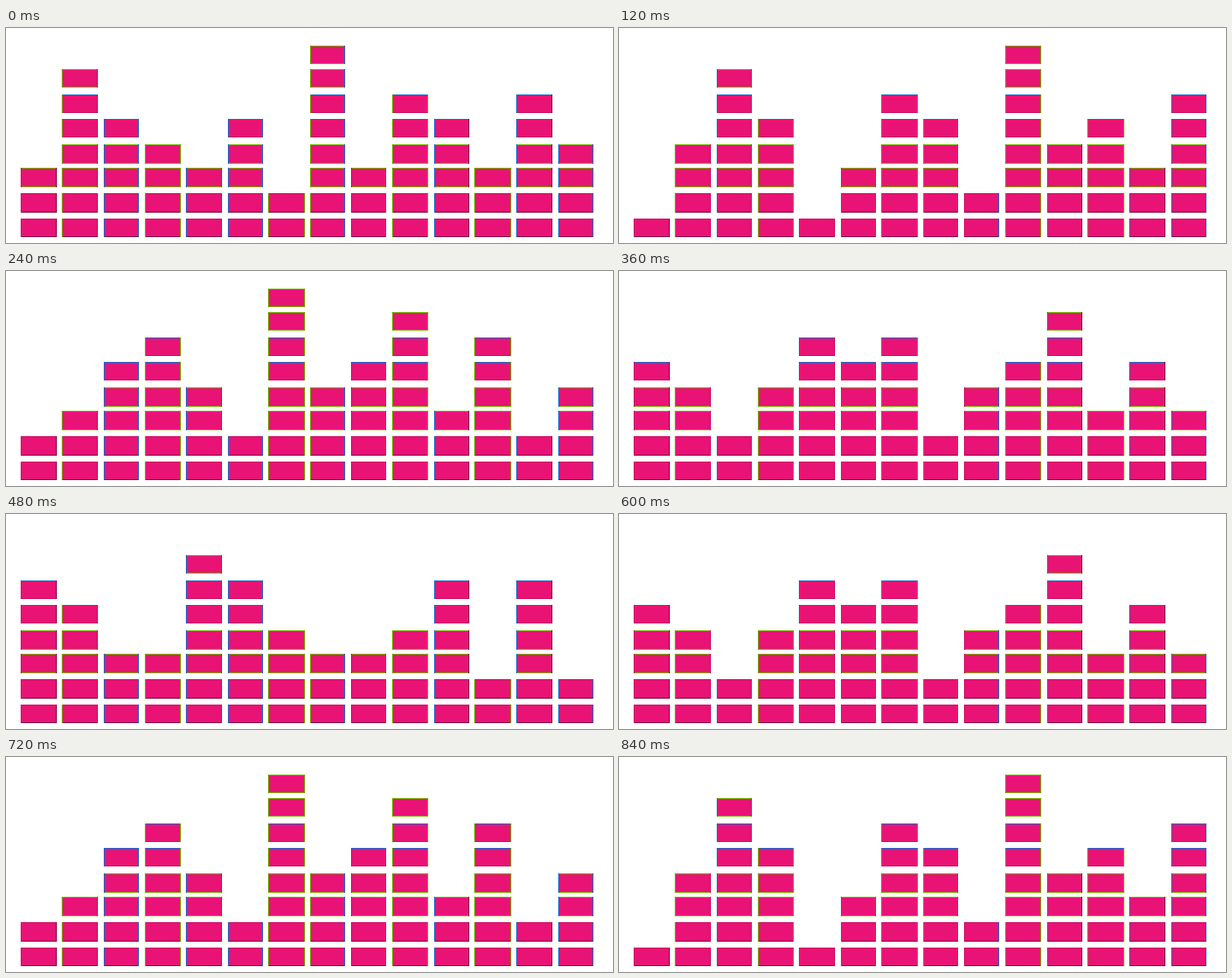
An HTML page with a canvas for the animation above (0.96 s loop, 621 px wide and 220 px high).

```html
<!DOCTYPE html>
<html lang="en">
<head>
<meta charset="utf-8">
<title>Equalizer</title>
<style>
  html, body { margin: 0; width: 100%; height: 100%; overflow: hidden; background: #fff; }
  canvas { display: block; }
</style>
</head>
<body>
<canvas id="stage" width="621" height="220"></canvas>
<script>
const ctx = document.getElementById('stage').getContext('2d');
const STEP = 120;
const PINK = '#e81374';
const EDGE = { g: '#80a810', b: '#3068c8', d: '#8c1450', p: '#d01468' };

// Left and right of each column, top and bottom of each row.
const columns = [
  [15, 52], [57, 94], [100, 136], [142, 179], [184, 221], [227, 263], [268, 306],
  [311, 347], [353, 389], [395, 432], [438, 474], [479, 517], [522, 559], [565, 601]
];
const rows = [
  [195, 214], [169, 189], [143, 163], [119, 139], [93, 112], [68, 87], [42, 61], [18, 37]
];

// Edge tints: top and bottom per row, left and right per column.
const rowTints = ['pd', 'pd', 'gg', 'gg', 'bp', 'bp', 'gg', 'gg'];
const columnTints = ['pd', 'gp', 'bb', 'gg', 'bp', 'bb', 'gg', 'gb', 'pb', 'gg', 'bd', 'gg', 'bd', 'bb'];

// Lit blocks per column; the poses play forwards, then backwards.
const poses = ['37543528365364', '14751365284536', '23564284573624', '54246562457353', '65337643346262'];
const order = [0, 1, 2, 3, 4, 3, 2, 1];

function rect(color, x, y, w, h) {
  ctx.fillStyle = color;
  ctx.fillRect(x, y, w, h);
}

function drawBlock(column, row) {
  const [x, right] = columns[column], [y, bottom] = rows[row];
  const [topTint, bottomTint] = rowTints[row];
  const [leftTint, rightTint] = columnTints[column];
  const w = right - x, h = bottom - y;
  rect(PINK, x, y, w, h);
  rect(EDGE[topTint], x, y, w, 1);
  rect(EDGE[bottomTint], x, bottom - 1, w, 1);
  rect(EDGE[leftTint], x, y, 1, h);
  rect(EDGE[rightTint], right - 1, y, 1, h);
}

function draw(time) {
  const pose = poses[order[Math.floor(time / STEP) % order.length]];
  rect('#fff', 0, 0, 621, 220);
  columns.forEach((_, column) => {
    for (let row = 0; row < +pose[column]; row++) drawBlock(column, row);
  });
}

const start = performance.now();
function tick() {
  draw(performance.now() - start);
  requestAnimationFrame(tick);
}
tick();
</script>
</body>
</html>
```
